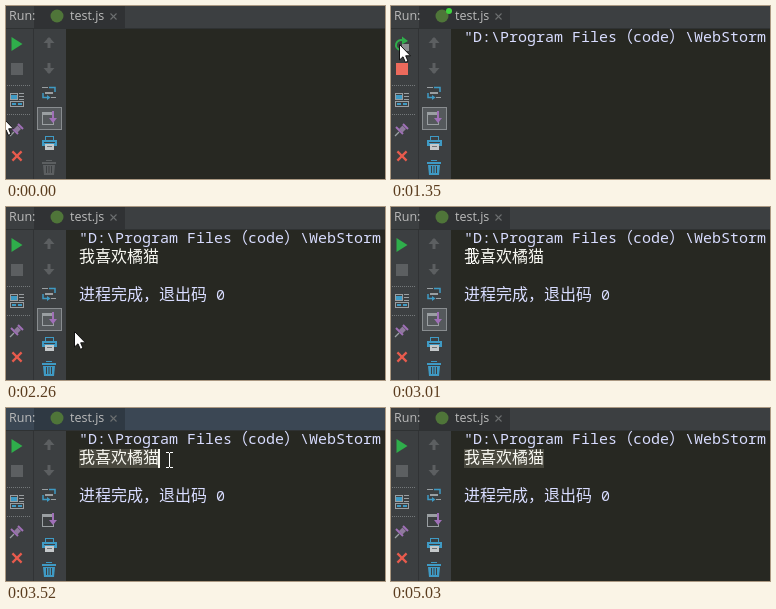
Write an HTML page with a canvas that moves like this. It is 379 px wide and 173 px high and loops after 5130 ms.

```html
<!DOCTYPE html>
<html lang="zh-CN">
<head>
<meta charset="utf-8">
<title>Run console</title>
<style>
  html, body { margin: 0; width: 100%; height: 100%; overflow: hidden; background: #272822; }
  canvas { display: block; width: 379px; height: 173px; }
</style>
</head>
<body>
<canvas id="stage" width="379" height="173"></canvas>
<script>
const ctx = document.getElementById('stage').getContext('2d');
const LOOP = 5130;
const UI = '12.5px "Open Sans", sans-serif';
const MONO = '15px "Noto Sans Mono", monospace';
const CJK = '16px "Noto Sans CJK SC", "Noto Sans CJK", sans-serif';
const BAR = '#3c3f41', GREY = '#9a9fa2', DIM = '#5c5f61';
const BLUE = '#3f9ac4', PURPLE = '#a070b8', GREEN = '#2fae4b';
const OUTPUT = '#f8f8f2', SYSTEM = '#d8dcff';

// [start, shape, x, y]
const POINTER = [
  [0, 'arrow', -4, 111], [120, 'arrow', 12, 97], [270, 'arrow', 15, 72],
  [420, 'arrow', 14, 42], [570, 'arrow', 8, 38], [1500, 'none'],
  [2260, 'arrow', 68, 124], [2410, 'beam', 147, 92], [2560, 'beam', 106, 63],
  [2710, 'beam', 83, 47], [2860, 'beam', 78, 42], [3010, 'beam', 77, 41],
  [3160, 'beam', 87, 42], [3280, 'beam', 111, 43], [3400, 'beam', 140, 44],
  [3520, 'beam', 160, 44], [4110, 'beam', 164, 64], [4260, 'beam', 234, 117],
  [4410, 'beam', 298, 157], [4570, 'none']
];
// [start, selected characters]
const SELECTION = [[0, 0], [3160, 1], [3280, 3], [3400, 4], [3520, 5]];

const within = (t, from, to) => t >= from && t < to;
const latest = (steps, t) => steps.filter(step => step[0] <= t).pop();

function rect(color, x, y, w, h) {
  ctx.fillStyle = color;
  ctx.fillRect(x, y, w, h);
}

function trace(points, closed) {
  ctx.beginPath();
  points.forEach(([x, y]) => ctx.lineTo(x, y));
  if (closed) ctx.closePath();
}

function poly(color, ...points) {
  trace(points, true);
  ctx.fillStyle = color;
  ctx.fill();
}

function line(color, width, ...points) {
  trace(points, false);
  ctx.strokeStyle = color;
  ctx.lineWidth = width;
  ctx.stroke();
}

function disc(color, x, y, r) {
  ctx.beginPath();
  ctx.arc(x, y, r, 0, Math.PI * 2);
  ctx.fillStyle = color;
  ctx.fill();
}

function frame(color, x, y, w, h) {
  ctx.strokeStyle = color;
  ctx.lineWidth = 1;
  ctx.strokeRect(x + .5, y + .5, w - 1, h - 1);
}

function cross(color, width, x, y, r) {
  line(color, width, [x - r, y - r], [x + r, y + r]);
  line(color, width, [x + r, y - r], [x - r, y + r]);
}

function label(text, font, color, x, y) {
  ctx.font = font;
  ctx.fillStyle = color;
  ctx.fillText(text, x, y);
}

function consoleLine(text, color, y) {
  let x = 73;
  for (const run of text.match(/[\x20-\x7e]+|[^\x20-\x7e]+/g)) {
    const ascii = run.charCodeAt(0) < 127;
    label(run, ascii ? MONO : CJK, color, x, y);
    x += run.length * (ascii ? 9 : 16);
  }
}

function drawHeader(focused, running) {
  rect(focused ? '#3b4754' : BAR, 0, 0, 379, 22);
  rect('rgba(0,0,0,.2)', 28, 0, 91, 22);
  rect('#2f3233', 0, 22, 379, 1);
  label('Run:', UI, '#bbbbbb', 3, 14);
  disc('#4f7539', 51, 10, 6.5);
  if (running) disc('#3fd43f', 58, 5, 3);
  label('test.js', UI, '#bbbbbb', 64, 14);
  cross('#6c6f71', 1.1, 107.5, 10.5, 3);
}

function drawRunIcon(running) {
  if (!running) {
    poly(GREEN, [5.5, 31], [16.5, 38], [5.5, 45]);
    return;
  }
  ctx.beginPath();
  ctx.arc(10, 39, 5, Math.PI * .6, Math.PI * 1.65);
  ctx.strokeStyle = GREEN;
  ctx.lineWidth = 2;
  ctx.stroke();
  poly(GREEN, [11, 30.5], [17, 35], [11, 38.5]);
  rect('#8b8e90', 11, 38, 7, 7);
}

function drawLeftTools(t, running) {
  if (within(t, 120, 270)) rect('#4c5052', 0, 82, 23, 23);
  if (within(t, 420, 1350)) rect('#4c5052', 0, 26, 23, 23);
  drawRunIcon(running);
  rect(running ? '#ec6a5c' : DIM, 5, 57, 12, 12);
  for (let x = 1; x < 24; x += 2) {
    rect('#74787a', x, 79, 1, 1);
    rect('#74787a', x, 108, 1, 1);
  }

  // Layout
  frame(GREY, 4, 87, 8, 7);
  rect(BLUE, 5, 89, 6, 4);
  for (const y of [87, 90, 93]) rect(GREY, 13, y, 5, 1);
  frame(GREY, 4, 95, 14, 6);
  rect(BLUE, 6, 97, 4, 2);
  rect(BLUE, 12, 97, 4, 2);

  // Pin
  line(GREY, 1.2, [4, 130], [8, 126]);
  line(PURPLE, 2, [5, 121], [12, 128]);
  poly('#8e7a9c', [8, 123], [11.5, 119.5], [15, 123], [11.5, 126.5]);
  line(PURPLE, 2, [12, 118], [17, 123]);

  cross('#e85b4d', 2.2, 11, 150, 4.6);
}

function drawVerticalArrow(y, dir) {
  rect(DIM, 41.5, y - 5, 3, 10);
  poly(DIM, [37.5, y], [48.5, y], [43, y + dir * 6]);
}

function drawConsoleTools(canClear, boxed) {
  drawVerticalArrow(37, -1);
  drawVerticalArrow(62, 1);

  // Soft wrap
  rect(GREY, 36, 81, 6, 1);
  line(BLUE, 1.5, [43, 81.5], [49, 81.5], [49, 86]);
  rect(GREY, 39, 86, 8, 2);
  line(BLUE, 1.5, [37, 87], [37, 91.5], [42, 91.5]);
  poly(BLUE, [41, 89], [44.5, 91.5], [41, 94]);
  rect(GREY, 45, 91, 5, 1);

  // Scroll to end
  if (boxed) {
    rect('#55595c', 31, 101, 25, 23);
    frame('#898d90', 31, 101, 25, 23);
  }
  frame(GREY, 36, 106, 12, 13);
  rect(GREY, 36, 106, 12, 3);
  rect(PURPLE, 46, 105, 2, 8);
  poly(PURPLE, [43, 112], [51, 112], [47, 117]);

  // Printer
  frame(BLUE, 39, 130, 9, 5);
  rect(BLUE, 36, 134, 15, 6);
  rect(BAR, 38, 136, 11, 1);
  rect('#c4c8ca', 39, 138, 9, 6);
  rect('#6f7375', 41, 140, 5, 1);

  // Trash
  const bin = canClear ? BLUE : DIM;
  rect(bin, 40, 154, 6, 1);
  rect(bin, 36, 156, 14, 2);
  poly(bin, [37, 159], [49, 159], [48, 169], [38, 169]);
  for (const x of [40, 42.5, 45]) rect(BAR, x, 160, 1, 7);
}

function drawConsole(t) {
  rect('#272822', 60, 23, 319, 150);
  const selected = latest(SELECTION, t)[1] * 16;
  rect('#49483e', 73, 41, selected, 19);
  if (t >= 1350) consoleLine('"D:\\Program Files（code）\\WebStorm', SYSTEM, 36);
  if (t >= 1800) {
    consoleLine('我喜欢橘猫', OUTPUT, 55);
    consoleLine('进程完成，退出码 0', SYSTEM, 93);
  }
  if (within(t, 3160, 4110) || within(t, 4570, 5030)) {
    rect('#f8f8f0', 72 + selected, 41, 2, 19);
  }
}

function drawPointer(t) {
  const [, shape, x, y] = latest(POINTER, t);
  if (shape === 'none') return;
  ctx.save();
  ctx.translate(x, y);
  if (shape === 'arrow') {
    const outline = [[.5, .5], [.5, 16], [4, 12.8], [6.4, 18.3], [9, 17.2], [6.7, 11.8], [11.5, 11.8]];
    poly('#ffffff', ...outline);
    line('#111111', 1, ...outline, outline[0]);
  } else {
    for (const edge of [0, 15]) {
      rect('#ffffff', 0, edge, 3, 1);
      rect('#ffffff', 4, edge, 3, 1);
    }
    rect('#ffffff', 3, 1, 1, 14);
  }
  ctx.restore();
}

function draw(now) {
  const t = now % LOOP;
  const running = within(t, 1350, 1650);
  rect(BAR, 0, 0, 379, 173);
  drawHeader(within(t, 3160, 5030), running);
  rect('#313335', 27, 23, 1, 150);
  drawLeftTools(t, running);
  drawConsoleTools(t >= 1350, t < 3160);
  drawConsole(t);
  drawPointer(t);
  requestAnimationFrame(draw);
}

draw(0);
</script>
</body>
</html>
```
